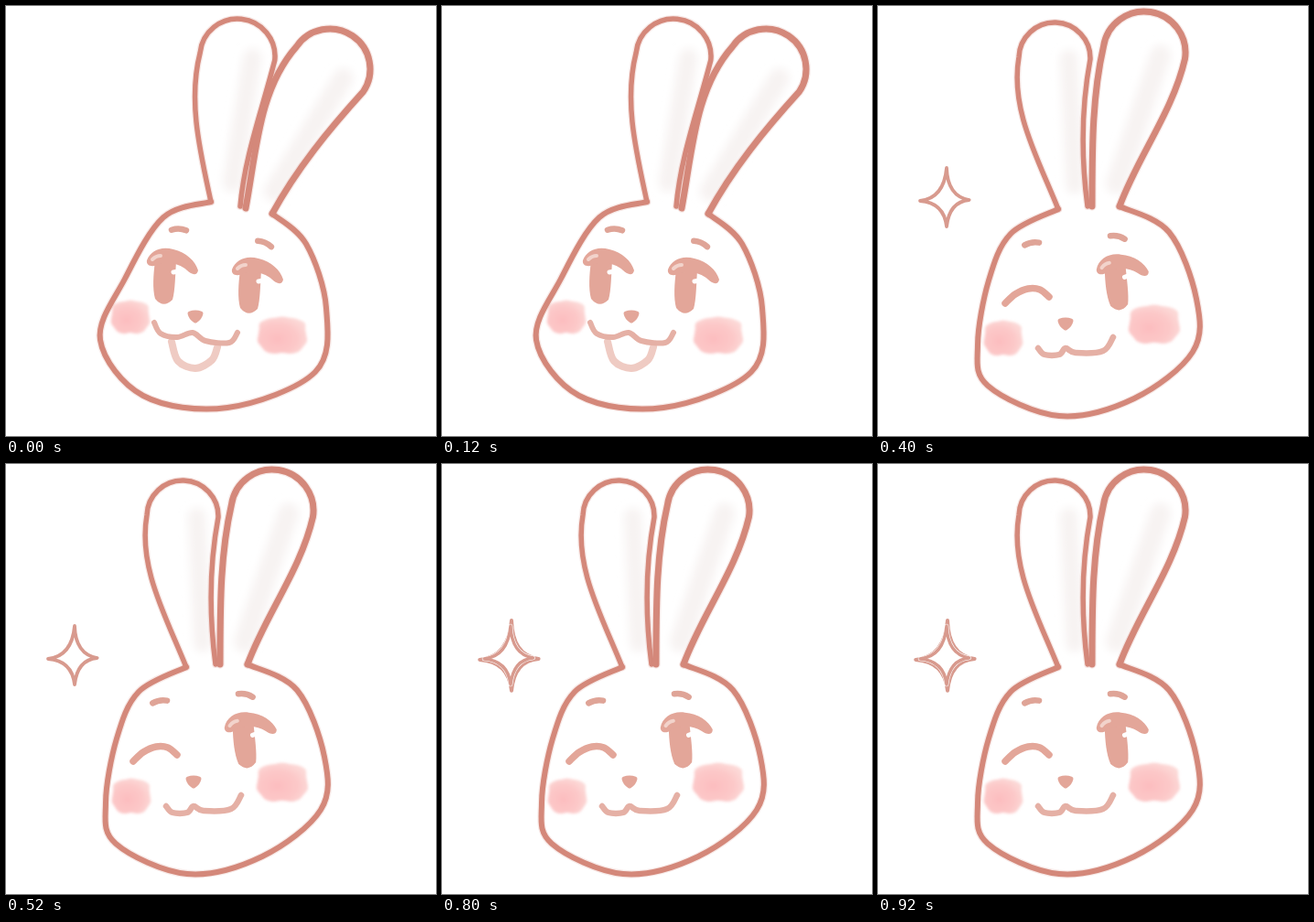
Write an HTML page that moves like this. It is 470 px wide and 470 px high and loops after 1 s.

```html
<!DOCTYPE html>
<html lang="en">
<head>
<meta charset="utf-8">
<title>Winking bunny</title>
<style>
html, body { margin: 0; width: 100%; height: 100%; overflow: hidden; background: #fff; }
svg { display: block; width: 100%; height: 100%; }
path { stroke-linecap: round; stroke-linejoin: round; }
</style>
</head>
<body>
<svg id="stage" viewBox="0 0 470 470">
  <defs>
    <filter id="soft" filterUnits="userSpaceOnUse" x="0" y="0" width="470" height="470"><feGaussianBlur stdDeviation=".6"/></filter>
    <filter id="wash" filterUnits="userSpaceOnUse" x="0" y="0" width="470" height="470"><feGaussianBlur stdDeviation="1.6"/></filter>
    <filter id="shade" filterUnits="userSpaceOnUse" x="0" y="0" width="470" height="470"><feGaussianBlur stdDeviation="5"/></filter>
    <radialGradient id="blush" cx=".4" cy=".6" r=".65">
      <stop offset="0" stop-color="#fcbdbf"/>
      <stop offset=".6" stop-color="#fcc8c8"/>
      <stop offset="1" stop-color="#fcdad8"/>
    </radialGradient>
  </defs>
</svg>
<script>
const LINE = '#d4887a', EYE = '#e3a699', LIP = '#e5b0a5', CHIN = '#efcbc3', STAR = '#d89a8e';
const stage = document.getElementById('stage');

function add(parent, tag, attrs) {
  const el = document.createElementNS('http://www.w3.org/2000/svg', tag);
  for (const k in attrs) el.setAttribute(k, attrs[k]);
  return parent.appendChild(el);
}

const group = (parent, attrs) => add(parent, 'g', attrs);
const fill = (g, d, color) => add(g, 'path', { d, fill: color });
const stroke = (g, d, width, color) =>
  add(g, 'path', { d, fill: 'none', stroke: color, 'stroke-width': width });
const points = text => text.split(' ').map(s => s.split(',').map(Number));
const mix = (a, b, t) => a.map((v, k) => v + (b[k] - v) * t);
const move = (p, dir, len) => p.map((v, k) => v + dir[k] * len);

// Smooth curve through points
function curve(p) {
  let d = 'M' + p[0];
  for (let i = 0; i < p.length - 1; i++) {
    const a = p[i - 1] || p[i], b = p[i], c = p[i + 1], e = p[i + 2] || c;
    const c1 = b.map((v, k) => v + (c[k] - a[k]) / 6);
    const c2 = c.map((v, k) => v - (e[k] - b[k]) / 6);
    d += `C${c1} ${c2} ${c}`;
  }
  return d;
}

function ink(g, d, width) {
  stroke(g, d, width + 2.5, LINE).setAttribute('opacity', .18);
  stroke(g, d, width, LINE);
}

// A round cap whose two sides run down to the base points
function ear(g, { left, right, cap, r, tilt, bend = 8 }, width) {
  const a = tilt * Math.PI / 180;
  const up = [Math.sin(a), -Math.cos(a)], out = [Math.cos(a), Math.sin(a)];
  const side = (base, s) => {
    const top = move(cap, out, s * r);
    const len = Math.hypot(top[0] - base[0], top[1] - base[1]);
    return { top, high: move(move(top, up, -len / 3), out, -bend), low: move(mix(base, top, 1 / 3), out, -bend) };
  };
  const l = side(left, -1), k = side(right, 1);
  const from = move(cap, out, r * .4), to = mix(left, right, .6);
  const glow = stroke(g, `M${from}L${mix(from, to, .85)}`, r * .5, '#f7f3f2');
  glow.setAttribute('filter', 'url(#shade)');
  ink(g, `M${left}C${l.low} ${l.high} ${l.top}A${r} ${r} 0 0 1 ${k.top}C${k.high} ${k.low} ${right}`, width);
}

// Rounded patch with an uneven rim
function cheek(g, x, y, rx, ry) {
  const rim = Array.from({ length: 21 }, (_, i) => {
    const a = i * Math.PI / 10, k = 1 - .06 * Math.cos(4 * a) + .04 * Math.sin(7 * a);
    return [x + rx * k * Math.cos(a), y + ry * k * Math.sin(a)];
  });
  fill(g, curve(rim) + 'Z', 'url(#blush)').setAttribute('filter', 'url(#wash)');
}

function eye(g, x, y, turn = 0) {
  const e = group(g, { transform: `translate(${x} ${y}) rotate(${turn})` });
  fill(e, 'M-17 4C-19 18 -20 34 -17 45Q-8 56 2 46C5 36 5 18 6 4Z', EYE);
  fill(e, 'M-26 3C-22 -8 -10 -13 3 -9C17 -6 27 4 30 14C29 20 23 19 18 14C9 6 -4 4 -15 8C-22 11 -27 8 -26 3Z', EYE);
  stroke(e, 'M-20 2Q-16 -2 -11 -2', 4, '#f2d3cb');
  stroke(e, 'M3 16L8 15', 5, '#fff');
}

function brow(g, x, y, turn) {
  stroke(g, 'M-8 1Q0 -2 8 1', 6.5, '#dfa497')
    .setAttribute('transform', `translate(${x} ${y}) rotate(${turn})`);
}

function nose(g, x, y) {
  stroke(g, `M${x - 6} ${y - 4}Q${x} ${y - 6} ${x + 6} ${y - 4}Q${x + 5} ${y + 1} ${x} ${y + 4}Q${x - 5} ${y + 1} ${x - 6} ${y - 4}Z`, 5, EYE)
    .setAttribute('fill', EYE);
}

const line = (g, text, width, color) => stroke(g, curve(points(text)), width, color);

function smile(g, lean) {
  cheek(g, 136, 340 - lean, 22, 19);
  cheek(g, 302, 360 + lean, 28, 21);
  eye(g, 180, 275);
  eye(g, 273, 285);
  nose(g, 207, 340);
  line(g, '181,367 188,388 207,396 225,387 231,373', 8, CHIN);
  line(g, '162,346 169,358 187,362 204,357 218,366 244,368 253,357', 6, LIP);
}

function wink(g) {
  cheek(g, 137, 363, 22, 20);
  cheek(g, 302, 348, 29, 22);
  eye(g, 264, 281, -9);
  nose(g, 205, 348);
  line(g, '139,325 150,315 164,309 177,310 187,318', 7.5, EYE);
  line(g, '175,374 182,381 198,381 205,374 216,379 246,377 257,362', 6.5, LIP);
}

const smileHead = '328,260 350,330 338,400 242,439 150,426 103,365 130,298 172,231';
const winkHead = '318,247 348,320 344,378 280,429 198,448 120,415 109,370 121,300 145,249';

// The head runs between the outer feet of the ears
function bunny({ ears, head, shift = 0, face, brows }) {
  const g = group(stage, { filter: 'url(#soft)' });
  const inner = points(head).map(([x, y]) => [x + shift, y]);
  face(group(g, { transform: `translate(${shift} 0)` }), -shift);
  ears.forEach((e, i) => ear(g, e, 5.5 + 1.5 * i));
  ink(g, curve([ears[1].right, ...inner, ears[0].left]), 6);
  for (const b of brows) brow(g, ...b);
  return g;
}

const smileBrows = [[189, 244, 2], [283, 259, 24]];
const bunnies = [
  bunny({
    ears: [{ left: [224, 214], right: [256, 219], cap: [253, 55], r: 41, tilt: 6 },
           { left: [262, 221], right: [291, 227], cap: [354, 69], r: 44, tilt: 34 }],
    head: smileHead, face: g => smile(g, 0), brows: smileBrows
  }),
  bunny({
    ears: [{ left: [237, 210], right: [263, 215], cap: [309, 58], r: 40, tilt: 25 },
           { left: [265, 215], right: [295, 232], cap: [401, 102], r: 44, tilt: 48 }],
    head: smileHead, shift: -5, face: smile, brows: smileBrows
  }),
  bunny({
    ears: [{ left: [197, 222], right: [229, 219], cap: [193, 57], r: 39, tilt: 2 },
           { left: [234, 219], right: [264, 219], cap: [291, 51], r: 45, tilt: 9, bend: 4 }],
    head: winkHead, face: wink, brows: [[168, 259, -10], [262, 252, 12]]
  })
];

// Four-pointed star with hollow sides
function star(g, x, y, size, width, color) {
  const w = 29 * size, h = 35 * size;
  stroke(g, `M${x} ${y - h}Q${x + 1} ${y - 4} ${x + w * .85} ${y}Q${x + 3} ${y + 2} ${x} ${y + h * .83}` +
    `Q${x - 3} ${y + 3} ${x - w} ${y + 1}Q${x - 3} ${y - 2} ${x} ${y - h}Z`, width, color);
}

const small = [75, 212, 1], big = [76, 213, 1.2];
const sparkle = (...layers) => {
  const g = group(stage, { filter: 'url(#soft)' });
  for (const [place, width, color] of layers) star(g, ...place, width, color);
  return g;
};
const sparkles = [
  sparkle([small, 3.8, STAR]),
  sparkle([big, 4, STAR]),
  sparkle([big, 4, STAR], [small, 4.6, '#fff'], [small, 3.4, STAR])
];

function show(list, n) {
  list.forEach((el, i) => el.setAttribute('display', i === n ? 'inline' : 'none'));
}

const STEP = 200, LOOP = 1000;
let start;
function update(now) {
  start ??= now;
  const step = Math.floor((now - start) % LOOP / STEP);
  show(bunnies, Math.min(step, 2));
  show(sparkles, step - 2);
  requestAnimationFrame(update);
}
requestAnimationFrame(update);
</script>
</body>
</html>
```
